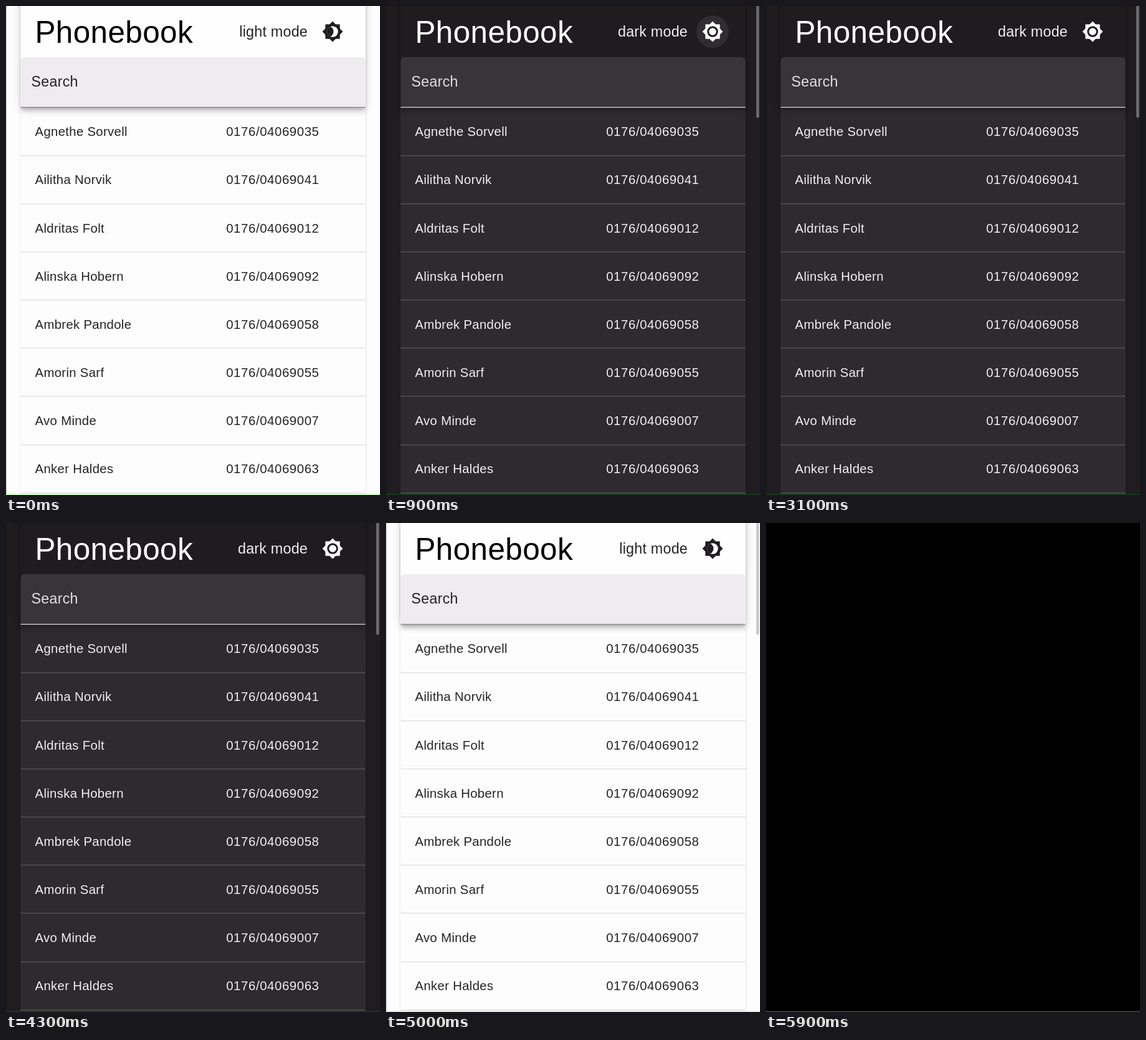
An HTML page with a canvas for the animation above (6000 ms loop, 600 px wide and 783 px high).

```html
<!DOCTYPE html>
<html lang="en">
<head>
<meta charset="utf-8">
<title>Phonebook</title>
<style>
  html, body { margin: 0; width: 100%; height: 100%; overflow: hidden; background: #000; }
  canvas { display: block; }
</style>
</head>
<body>
<canvas id="stage" width="600" height="783"></canvas>
<script>
const ctx = document.getElementById('stage').getContext('2d');
const W = 600, H = 783, LOOP = 6000, STEP = 100;
const TO_DARK = 500, TO_LIGHT = 4400, BLACKOUT = 5900;
const UNIT = 1.455; // page zoom: stage pixels per CSS pixel
const LEFT = 23.5, RIGHT = 576.5, BAR_BOTTOM = 163, ROW = 77.15;
const FONT = '"Liberation Sans", Arial, sans-serif';

const contacts = [
  ['Agnethe Sorvell', '0176/04069035'],
  ['Ailitha Norvik', '0176/04069041'],
  ['Aldritas Folt', '0176/04069012'],
  ['Alinska Hobern', '0176/04069092'],
  ['Ambrek Pandole', '0176/04069058'],
  ['Amorin Sarf', '0176/04069055'],
  ['Avo Minde', '0176/04069007'],
  ['Anker Haldes', '0176/04069063']
];

const light = {
  label: 'light mode', page: [254, 253, 254], bar: [254, 254, 254], paper: [254, 253, 254],
  search: [238, 236, 238], searchText: [38, 36, 38], underline: [140, 138, 140],
  title: [0, 0, 0], text: [38, 37, 38], icon: [31, 29, 31], line: [226, 224, 228],
  scroll: [202, 200, 202], edge: [190, 188, 190], base: [190, 250, 180]
};
const dark = {
  label: 'dark mode', page: [31, 29, 31], bar: [30, 28, 30], paper: [45, 43, 45],
  search: [55, 53, 55], searchText: [224, 223, 224], underline: [200, 199, 200],
  title: [255, 255, 255], text: [240, 239, 240], icon: [255, 255, 255], line: [82, 80, 82],
  scroll: [108, 106, 108], edge: [24, 27, 24], base: [26, 62, 28]
};

const clamp = v => Math.max(0, Math.min(1, v));
const rgb = c => `rgb(${c.join()})`;
const mix = (a, b, k) => rgb(a.map((v, i) => Math.round(v + (b[i] - v) * k)));

function box(x, y, w, h, color) {
  ctx.fillStyle = color;
  ctx.fillRect(x, y, w, h);
}

function write(str, x, y, size, color, spacing, align = 'left') {
  ctx.font = `${size}px ${FONT}`;
  ctx.letterSpacing = spacing + 'px';
  ctx.textAlign = align;
  ctx.fillStyle = color;
  ctx.fillText(str, x, y);
}

// Each shadow layer: [offset, blur, spread, alpha]
function raised(top, bottom, color, layers) {
  for (const [offset, blur, spread, alpha] of layers) {
    const s = spread * UNIT;
    ctx.save();
    ctx.shadowOffsetY = offset * UNIT;
    ctx.shadowBlur = blur * UNIT;
    ctx.shadowColor = `rgba(0,0,0,${alpha})`;
    box(LEFT - s, top - s, RIGHT - LEFT + 2 * s, bottom - top + 2 * s, color);
    ctx.restore();
  }
  box(LEFT, top, RIGHT - LEFT, bottom - top, color);
}

function disc(r, color) {
  ctx.fillStyle = color;
  ctx.beginPath();
  ctx.arc(0, 0, r, 0, Math.PI * 2);
  ctx.fill();
}

function modeIcon(theme, halo) {
  const ink = rgb(theme.icon), hole = rgb(theme.bar);
  ctx.save();
  ctx.translate(524, 41);
  if (halo > 0) disc(26, `rgba(255,255,255,${0.075 * halo})`);
  ctx.scale(UNIT, UNIT);
  for (let i = 0; i < 2; i++) {
    box(-8, -8, 16, 16, ink);
    ctx.rotate(Math.PI / 4);
  }
  ctx.rotate(-Math.PI / 2);
  disc(6, hole);
  if (theme === dark) {
    disc(4, ink);
  } else {
    ctx.beginPath();
    ctx.arc(0, 0, 6.1, 0, Math.PI * 2);
    ctx.clip();
    ctx.translate(-5, 0);
    disc(6, ink);
  }
  ctx.restore();
}

function rows(theme) {
  raised(BAR_BOTTOM, H + 20, rgb(theme.paper), [[2, 1, -1, .2], [1, 1, 0, .14], [1, 3, 0, .12]]);
  contacts.forEach(([name, phone], i) => {
    const y = 208.3 + i * ROW;
    write(name, 46.6, y, 20.4, rgb(theme.text), .28);
    write(phone, 353.2, y, 20.4, rgb(theme.text), .58);
    box(LEFT, Math.round(238.7 + i * ROW), RIGHT - LEFT, 1.5, rgb(theme.line));
  });
}

function header(theme, settle, halo) {
  const bar = theme.bar;
  raised(-30, BAR_BOTTOM, rgb(bar), [[2, 4, -1, .2], [4, 5, 0, .14], [1, 10, 0, .12]]);
  write('Phonebook', 46.4, 59, 49.5, rgb(theme.title), .36);
  write(theme.label, 484, 49.4, 23.3, rgb(theme.text), .22, 'right');
  modeIcon(theme, halo);

  ctx.fillStyle = mix(bar, theme.search, settle);
  ctx.beginPath();
  ctx.roundRect(LEFT, 82, RIGHT - LEFT, 81, [6, 6, 0, 0]);
  ctx.fill();
  box(LEFT, 161.6, RIGHT - LEFT, 1.4, mix(bar, theme.underline, settle * settle));
  write('Search', 40.6, 129.4, 23.3, mix(bar, theme.searchText, settle), .22);
}

function draw(time) {
  const t = Math.floor((time % LOOP) / STEP) * STEP;
  if (t >= BLACKOUT) {
    box(0, 0, W, H, '#000');
    box(0, H - 1, W, 1, '#666');
    return;
  }
  const isDark = t >= TO_DARK && t < TO_LIGHT;
  const theme = isDark ? dark : light;
  const since = t < TO_DARK ? Infinity : t - (isDark ? TO_DARK : TO_LIGHT);
  const settle = clamp((since + 90) / 200);
  const halo = isDark ? clamp((1300 - t) / 300) : 0;

  box(0, 0, W, H, rgb(theme.page));
  rows(theme);
  header(theme, settle, halo);
  box(0, 0, 1, H, rgb(theme.edge));
  if (t >= TO_DARK) {
    ctx.fillStyle = rgb(theme.scroll);
    ctx.beginPath();
    ctx.roundRect(594, -4, 4.6, 183, 2);
    ctx.fill();
  }
  box(0, H - 1.5, W, 1.5, rgb(theme.base));
}

const start = performance.now();
function tick() {
  draw(performance.now() - start);
  requestAnimationFrame(tick);
}
tick();
</script>
</body>
</html>
```
